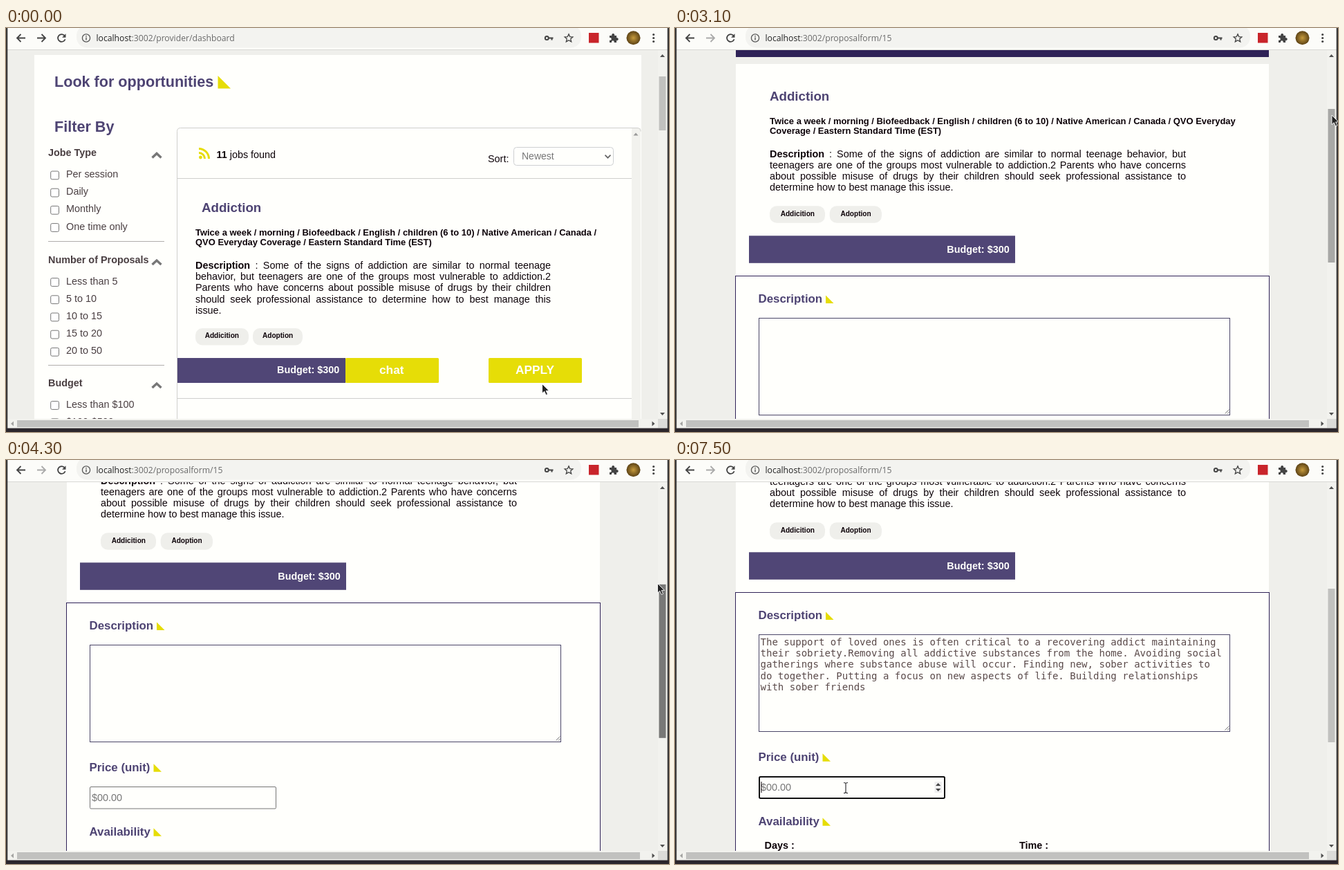
An HTML page that plays this animation: 959x584 px, repeating every 8 s.

```html
<!DOCTYPE html>
<html lang="en">
<head>
<meta charset="utf-8">
<title>Job proposal</title>
<style>
html, body { margin: 0; width: 100%; height: 100%; overflow: hidden; background: #efefeb; }
svg { display: block; font-family: "Liberation Sans", Arial, sans-serif; white-space: pre; }
.mono { font-family: "DejaVu Sans Mono", monospace; }
.ui { font-family: "Open Sans", "Noto Sans", sans-serif; }
</style>
</head>
<body>
<svg id="stage" width="959" height="584" viewBox="0 0 959 584"></svg>
<script>
const PAPER = '#fffffc', PURPLE = '#4e4473', BAR = '#504676', NAVY = '#2f2257',
  YELLOW = '#e6dd07', INK = '#0d0309', SOFT = '#4a3f42', LINE = '#cfcfcd', CHIP = '#efefeb';
const stage = document.getElementById('stage');

const rect = (x, y, w, h, fill, more = '') =>
  `<rect x="${x}" y="${y}" width="${w}" height="${h}" fill="${fill}" ${more}/>`;
const path = (d, stroke, width = 1, more = '') =>
  `<path d="${d}" fill="none" stroke="${stroke}" stroke-width="${width}" ${more}/>`;
const shape = (d, fill, more = '') => `<path d="${d}" fill="${fill}" ${more}/>`;
const group = (id, body) => `<g id="${id}">${body}</g>`;
const text = (x, y, s, { size = 14.4, bold = false, fill = INK, more = '' } = {}) =>
  `<text x="${x}" y="${y}" font-size="${size}" font-weight="${bold ? 700 : 400}" fill="${fill}" ${more}>${s}</text>`;
const bold = (x, y, s, size, fill = INK) => text(x, y, s, { size, bold: true, fill });
const corner = (x, y, size) => shape(`M${x} ${y}v${-size}l${size} ${size}z`, YELLOW);
const chip = (x, y, w, s, pad) => rect(x, y, w, 24.5, CHIP, 'rx="10"') + bold(x + pad, y + 14.3, s, 10.08);
const heading = (x, y, s, markX) => bold(x, y, s, 16.85, PURPLE) + corner(markX, y + 1, 11.5);
const frameBox = (x, y, w, h, stroke, width = 1, radius = 0) =>
  rect(x, y, w, h, PAPER, `stroke="${stroke}" stroke-width="${width}" rx="${radius}"`);

// All lines but the last are justified to the given width
const paragraph = (x, y, width, lines) => lines.map((line, i) =>
  text(x, y + i * 16.2, line, { more: i < lines.length - 1 ? `data-width="${width}"` : '' })).join('');

function filter(title, y, options) {
  return bold(61, y, title, 14.4, SOFT)
    + path(`M211.5 ${y + 2}l6.5 -6 6.5 6`, '#777', 3.4)
    + options.map((option, i) => {
      const base = y + 30.6 + i * 25.2;
      return rect(64.7, base - 9, 11.8, 11.8, '#fff', 'rx="2" stroke="#767676"')
        + text(87, base, option, { fill: SOFT });
    }).join('');
}

const dashboard = () =>
  rect(41, 39, 878, 530, PAPER)
  + bold(70, 85, 'Look for opportunities', 21.6, PURPLE) + corner(306.5, 87.5, 18.5)
  + bold(70, 150, 'Filter By', 21.6, PURPLE)
  + filter('Jobe Type', 185.4, ['Per session', 'Daily', 'Monthly', 'One time only'])
  + path('M61 308.5H229M61 487.5H229', '#b0aeac')
  + filter('Number of Proposals', 340, ['Less than 5', '5 to 10', '10 to 15', '15 to 20', '20 to 50'])
  + filter('Budget', 518, ['Less than $100', '$100-$500'])
  + rect(905, 145, 13, 430, '#f2f2ee')
  + path('M247.5 570V149.5q0 -5 5 -5H913q5 0 5 5', LINE)
  + shape('M907.5 155.5l3.5 -4 3.5 4z', '#999')
  + path('M248 217.5H905M248 535.5H905', LINE)
  + `<circle cx="281.4" cy="187" r="2.4" fill="${YELLOW}"/>`
  + path('M279 180.5a8.5 8.5 0 0 1 8.5 8.5M279 174.5a14.5 14.5 0 0 1 14.5 14.5', YELLOW, 3)
  + text(304.5, 188, '<tspan font-weight="700">11</tspan> jobs found')
  + text(697, 194, 'Sort:')
  + frameBox(734.5, 172.5, 144, 26, '#ced0d2', 1, 4)
  + text(746, 190, 'Newest', { size: 14, fill: '#777' })
  + path('M866.5 183.7l4 4 4 -4', '#666', 1.7)
  + bold(283, 266, 'Addiction', 18.72, PURPLE)
  + bold(274, 300, 'Twice a week / morning / Biofeedback / English / children (6 to 10) / Native American / Canada /', 12.96)
  + bold(274, 314.4, 'QVO Everyday Coverage / Eastern Standard Time (EST)', 12.96)
  + paragraph(274, 348, 514, [
    '<tspan font-weight="700">Description</tspan> : Some of the signs of addiction are similar to normal teenage',
    'behavior, but teenagers are one of the groups most vulnerable to addiction.2',
    'Parents who have concerns about possible misuse of drugs by their children',
    'should seek professional assistance to determine how to best manage this',
    'issue.'])
  + chip(274, 434, 77, 'Addicition', 13.7) + chip(357, 434, 72, 'Adoption', 14)
  + rect(248, 477, 243, 36, BAR) + bold(392, 499, 'Budget: $300', 14.4, PAPER)
  + rect(491, 477, 135, 36, YELLOW, 'rx="1.5"') + bold(540, 500, 'chat', 17.28, PAPER)
  + rect(698, 477, 135, 36, YELLOW, 'rx="1.5"') + bold(737, 500, 'APPLY', 17.28, PAPER);

const answer = [
  'The support of loved ones is often critical to a recovering addict maintaining',
  'their sobriety.Removing all addictive substances from the home. Avoiding social',
  'gatherings where substance abuse will occur. Finding new, sober activities to',
  'do together. Putting a focus on new aspects of life. Building relationships',
  'with sober friends'];

const proposal = () =>
  rect(88, 20, 771, 22, NAVY) + rect(88, 52, 771, 800, PAPER)
  + bold(137, 104.6, 'Addiction', 18.72, PURPLE)
  + bold(137, 138.8, 'Twice a week / morning / Biofeedback / English / children (6 to 10) / Native American / Canada / QVO Everyday', 12.96)
  + bold(137, 153.2, 'Coverage / Eastern Standard Time (EST)', 12.96)
  + paragraph(137, 186.8, 602, [
    '<tspan font-weight="700">Description</tspan> : Some of the signs of addiction are similar to normal teenage behavior, but',
    'teenagers are one of the groups most vulnerable to addiction.2 Parents who have concerns',
    'about possible misuse of drugs by their children should seek professional assistance to',
    'determine how to best manage this issue.'])
  + chip(137, 257.3, 80, 'Addicition', 15.7) + chip(223.7, 257.3, 75.3, 'Adoption', 15.7)
  + rect(107, 300.3, 385, 39.5, BAR) + bold(393.3, 324.8, 'Budget: $300', 14.4, PAPER)
  + frameBox(87.5, 358.5, 772, 500, NAVY)
  + heading(120.5, 397, 'Description', 218)
  + frameBox(121.5, 419.5, 681, 140, '#4b4668')
  + group('areaFocus', frameBox(122, 420, 680, 139, '#111', 2, 1.5))
  + path('M795.5 557.5l6 -6M799 557.5l2.5 -2.5', '#777')
  + group('answer', answer.map((line, i) =>
    text(123.5, 435 + i * 16.2, line, { size: 14.04, fill: '#5a4a4a', more: 'class="mono"' })).join(''))
  + group('startCaret', path('M123.5 422V438', INK))
  + group('endCaret', path('M275.8 487V503', INK))
  + heading(120.5, 601.8, 'Price (unit)', 213.5)
  + frameBox(121.5, 624.5, 269, 31.5, '#767676', 1, 1.5)
  + group('priceFocus', frameBox(122, 625, 268, 31, '#111', 2, 2))
  + text(124, 644.6, '$00.00', { fill: '#777' })
  + group('priceCaret', path('M125 632V648', INK))
  + group('spinner', rect(375.5, 632, 10.5, 16, '#efefef')
    + shape('M377 638l3.7 -4 3.7 4zM377 642l3.7 4 3.7 -4z', '#444'))
  + heading(120.5, 694.7, 'Availability', 213.5)
  + bold(129.5, 729.4, 'Days :', 14.4) + bold(498, 729.4, 'Time :', 14.4);

const backArrow = 'M6 0H-6M-0.5 -5.5L-6 0L-0.5 5.5';
const browser = () =>
  rect(0, 0, 959, 32, '#fcfcf9') + rect(102, -4, 730, 32.5, '#f3f3f0', 'rx="15"')
  + path('M0 31.5H959', '#d8d8d5')
  + path(backArrow, '#444', 1.8, 'transform="translate(22 14.5)"')
  + path(backArrow, '#444', 1.8, 'id="forward" transform="translate(51 14.5) scale(-1 1)"')
  + path('M84.8 11.2A5.4 5.4 0 1 0 85.6 16.2', '#444', 1.8) + shape('M86.5 8.3v5.4h-5.4z', '#444')
  + '<circle cx="116" cy="14.5" r="5.6" fill="none" stroke="#555" stroke-width="1.3"/>'
  + path('M116 13.6v4M116 11v1.4', '#555', 1.4)
  + '<text id="url" class="ui" x="130.5" y="18.6" font-size="12.2" fill="#6a6a6a"><tspan fill="#222">localhost</tspan><tspan></tspan></text>'
  + '<circle cx="782.3" cy="14.4" r="2.5" fill="none" stroke="#444" stroke-width="2"/>'
  + path('M785 14.4h6.5M789.5 14.4v3', '#444', 2)
  + path('M814 8.8l1.7 3.8 4.2 .4 -3.2 2.8 1 4.1 -3.7 -2.2 -3.7 2.2 1 -4.1 -3.2 -2.8 4.2 -.4z', '#444', 1.3)
  + rect(843, 7, 14.5, 14.5, '#c9252b')
  + shape('M873 11h3.3a2.1 2.1 0 1 1 3.8 0h3v3.2a2 2 0 1 1 0 3.8v3h-3.5a1.9 1.9 0 1 0 -3.5 0h-3.1v-3.4a1.9 1.9 0 1 0 0 -3.4z', '#444')
  + `<radialGradient id="gold"><stop stop-color="#c69a3c"/><stop offset="1" stop-color="#5d4315"/></radialGradient>
     <circle cx="907.5" cy="14.3" r="10" fill="url(#gold)"/>`
  + [9.5, 14.5, 19.5].map(y => `<circle cx="936.7" cy="${y}" r="1.6" fill="#444"/>`).join('')
  + rect(943, 32, 14, 534, '#f2f2ee') + rect(0, 565, 959, 14, '#f2f2ee') + rect(943, 565, 14, 13, '#dcdcd9')
  + shape('M946 42l3.5 -4 3.5 4zM946 556l3.5 4 3.5 -4z', '#505050')
  + shape('M11 568.5l-4 3.5 4 3.5z', '#a5a5a3') + shape('M934.5 568.5l4 3.5 -4 3.5z', '#505050')
  + rect(16, 567, 900, 10, '#c1c1bf', 'id="thumbX"') + rect(944.5, 70, 10, 78, '#c1c1bf', 'id="thumbY"')
  + rect(0, 0, 2.3, 584, '#3a3838') + rect(956.7, 0, 2.3, 584, '#3a3838') + rect(0, 578.5, 959, 6, '#2b262b');

const beam = 'M-3 -7.5Q0 -7.5 0 -6V6Q0 7.5 -3 7.5M3 -7.5Q0 -7.5 0 -6M0 6Q0 7.5 3 7.5';
const cursor = () =>
  group('arrow', shape('M0 0V13.6L3.2 10.7 5.6 16 8 15 5.7 9.9H10Z', '#222', 'stroke="#fff" stroke-width=".9"'))
  + group('beam', path(beam, '#fff', 2.6) + path(beam, '#222', 1.1))
  + group('hand', shape('M-1.5 1q1.5 -2 3 0v5l6 1.5q1.5 .6 1.2 2.5l-1 5.5h-7l-4.5 -6q0 -2 2.3 -.6z', '#222', 'stroke="#fff" stroke-width=".9"'));

stage.innerHTML = group('dashboard', dashboard()) + group('proposal', proposal()) + browser() + group('cursor', cursor());

for (const line of stage.querySelectorAll('[data-width]')) {
  const gaps = line.textContent.split(' ').length - 1;
  line.style.wordSpacing = (line.dataset.width - line.getComputedTextLength()) / gaps + 'px';
}

const $ = id => document.getElementById(id);
const show = (id, on) => { $(id).style.display = on ? '' : 'none'; };

const pointer = [
  [100, 775.5, 514.5], [600, 766, 489], [700, 766, 489], [800, 767, 495], [1200, 767, 495],
  [1500, 380, 287], [1900, 188, 122], [2000, 188, 122], [2400, 849, 233], [2500, 849, 233],
  [3100, 950, 126], [3700, 950, 126], [4000, 948.5, 142.5], [4300, 942.5, 178.5], [4400, 943, 187],
  [4600, 943, 187], [5200, 352, 309], [6400, 352, 309], [6800, 274, 480], [6900, 274, 480],
  [7100, 260, 486], [7200, 247, 474]];
const scrolling = [[3700, 0], [4000, 50], [4300, 152], [4400, 167]];

function at(keys, t) {
  const next = keys.findIndex(key => key[0] > t);
  if (next < 0) return keys[keys.length - 1].slice(1);
  if (next === 0) return keys[0].slice(1);
  const a = keys[next - 1], b = keys[next], k = (t - a[0]) / (b[0] - a[0]);
  return a.slice(1).map((v, i) => v + (b[i + 1] - v) * k);
}

function draw(now) {
  const t = Math.floor(now % 8000 / 100) * 100;
  const within = (from, to) => t >= from && t < to;
  const form = t >= 800;
  const [x, y] = at(pointer, t), scroll = Math.round(at(scrolling, t)[0]);

  show('dashboard', !form);
  show('proposal', form);
  $('proposal').setAttribute('transform', `translate(0 ${-scroll})`);
  $('url').lastChild.textContent = form ? ':3002/proposalform/15' : ':3002/provider/dashboard';
  $('forward').setAttribute('stroke', form ? '#aaa' : '#444');

  const thumb = $('thumbY');
  thumb.setAttribute('y', form ? 117 + scroll / 2.42 : 70);
  thumb.setAttribute('height', form ? 222 : 78);
  thumb.setAttribute('fill', within(3700, 4700) ? '#787877' : within(3000, 3700) ? '#a8a8a6' : '#c1c1bf');
  $('thumbX').setAttribute('width', form ? 901 : 899);

  show('areaFocus', within(5500, 7400));
  show('startCaret', within(5500, 5900));
  show('answer', t >= 6200);
  show('endCaret', within(6200, 6700));
  show('spinner', t >= 6800);
  show('priceFocus', t >= 7400);
  show('priceCaret', t >= 7500);

  const kind = form ? (x < 800 ? 'beam' : 'arrow') : (y < 513 ? 'hand' : 'arrow');
  for (const id of ['arrow', 'beam', 'hand']) show(id, id === kind);
  $('cursor').setAttribute('transform', `translate(${x} ${y})`);
}

const start = performance.now();
function tick() {
  draw(performance.now() - start);
  requestAnimationFrame(tick);
}
tick();
</script>
</body>
</html>
```
